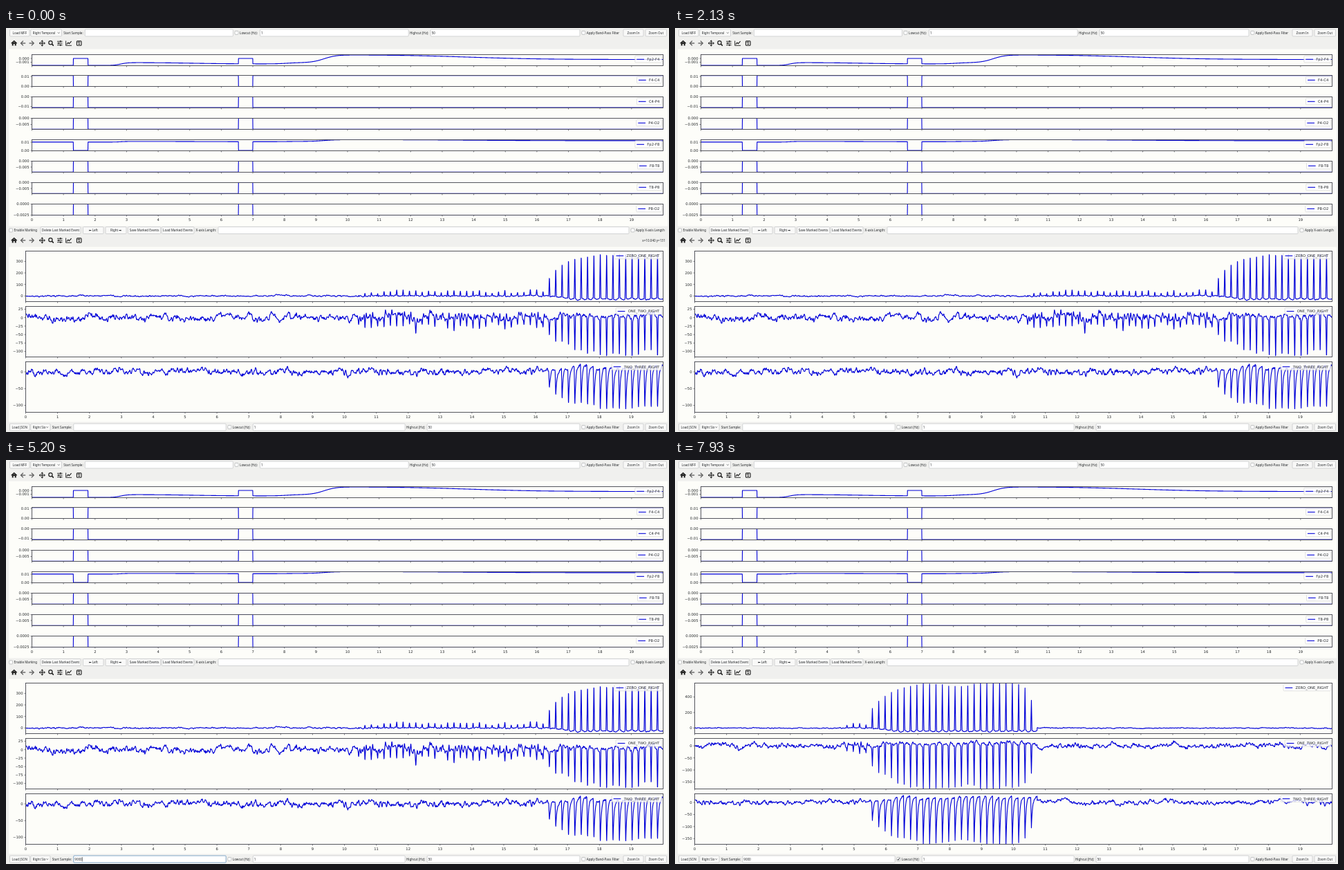
An HTML page with a canvas for the animation above (8000 ms loop, 959 px wide and 584 px high).

```html
<!DOCTYPE html>
<html lang="en">
<head>
<meta charset="utf-8">
<title>Signal viewer</title>
<style>
html, body { margin: 0; width: 100%; height: 100%; overflow: hidden; background: #f0f0ee; }
canvas { display: block; }
</style>
</head>
<body>
<canvas id="stage" width="959" height="584"></canvas>
<script>
const c = document.getElementById('stage').getContext('2d');
const BLUE = '#0000d8', INK = '#232629', FRAME = '#44454f', EDGE = '#c3c5c6', PAPER = '#fdfdf9';
const UI = '4.56px "Noto Sans", "Open Sans", sans-serif';
const PLOT = '5.25px "DejaVu Sans", sans-serif';
const RIGHT = 950.5;

// ---- helpers
function text(s, x, y, align = 'left', font = UI) {
  c.font = font;
  c.textAlign = align;
  c.fillStyle = INK;
  c.fillText(s, x, y + 1.75);
}

function box(x0, y0, x1, y1, fill, edge, width = .7) {
  c.beginPath();
  c.roundRect(x0, y0, x1 - x0, y1 - y0, 1);
  c.fillStyle = fill;
  c.fill();
  c.strokeStyle = edge;
  c.lineWidth = width;
  c.stroke();
}

function line(points, color, width) {
  c.beginPath();
  for (let i = 0; i < points.length; i += 2) c.lineTo(points[i], points[i + 1]);
  c.strokeStyle = color;
  c.lineWidth = width;
  c.stroke();
}

function hash(i, seed) {
  const v = Math.sin(i * 127.1 + seed * 311.7) * 43758.5453;
  return (v - Math.floor(v)) * 2 - 1;
}

function noise(x, seed) {
  const i = Math.floor(x), f = x - i;
  return hash(i, seed) + (hash(i + 1, seed) - hash(i, seed)) * f * f * (3 - 2 * f);
}

const rise = (x, at, width) => 1 / (1 + Math.exp((at - x) / width));

function trace(fn, x0) {
  const path = new Path2D();
  for (let x = x0; x <= RIGHT; x += .2) path.lineTo(x, fn(x));
  return path;
}

const label = (v, digits) => v.toFixed(digits).replace('-', '−');

// ---- upper plots
// Slow drift of the frontal electrode, in pixels
const drift = x => 4.2 * rise(x, 166, 5) - 2 * rise(x, 270, 30) + 1.8 * rise(x, 405, 8)
  + 11.5 * rise(x, 460, 9) - 7 * rise(x, 670, 55);

// name, first tick after zero, its distance, zero and resting level below the top, share of drift
const channels = [
  ['Fp2-F4', '-0.001', 5.5, 5.5, 15.6, 1],
  ['F4-C4', '0.01', -14.5, 16, .3, 0],
  ['C4-P4', '-0.01', 14, 0, 15.6, 0],
  ['P4-O2', '-0.005', 9, 0, 15.8, 0],
  ['Fp2-F8', '0.01', -12, 15.6, 3.4, .23],
  ['F8-T8', '-0.005', 8.5, 0, 15.7, 0],
  ['T8-P8', '-0.005', 8.5, 0, 15.8, 0],
  ['P8-O2', '-0.0025', 16, 0, 16, 0]
].map(([name, step, gap, zero, rest, share], i) => {
  const top = Math.floor(38 + i * 30.9) + .5, digits = step.length - step.indexOf('.') - 1;
  const pulse = x => (x > 97.5 && x < 118.6) || (x > 336.2 && x < 357);
  return {
    name, top, bottom: top + 16,
    ticks: [0, 1].map(n => [label(n * step, digits), top + zero + n * gap]),
    path: trace(x => top + (pulse(x) ? zero : rest - share * drift(x)), 37.5)
  };
});

// ---- lower plots: two windows on one stream of brain waves
const SHIFT = 500.5, FIRST = 786, GAP = 9.2, LAST = 25;
const leads = ['ZERO_ONE_RIGHT', 'ONE_TWO_RIGHT', 'TWO_THREE_RIGHT']
  .map((name, i) => ({ name, top: 322.5 + i * 80.2, bottom: 395 + i * 80.2 }));

// per lead: zero level, pixels per unit, tick step, tallest spike
const views = [
  [[387.3, .1664, 100, 67], [418.7, .489, 25, 56], [497, .486, 50, 56]],
  [[387.5, .1122, 200, 67], [413.2, .349, 50, 63], [495, .349, 50, 61]]
].map((rows, late) => rows.map(([zero, scale, step, tall], row) => {
  const ticks = [], { top, bottom } = leads[row];
  for (let v = -200; v <= 400; v += step) {
    const y = zero - v * scale;
    if (y > top && y < bottom) ticks.push([label(v, 0), y]);
  }
  return { zero, scale, ticks, path: trace(x => zero + wave(row, x, late, tall), 28.5) };
}));

function spikeSize(k, late) {
  const grow = 1 - .57 * Math.exp(-k / (late ? 3.2 : 2.4));
  if (!late) return grow;
  return grow * (1 - .4 * Math.exp(k - LAST)) * (1 - .1 * Math.exp(-(((k - 13.5) / 3) ** 2)));
}

function wave(row, x, late, tall) {
  const u = x + late * SHIFT, size = late ? .7 : 1;
  const k = Math.floor((u - FIRST + 1) / GAP), d = u - FIRST - k * GAP;
  const tip = Math.max(0, d < 0 ? 1 + d : 1 - d / .9);
  const y = size * [1.3, 6.2, 5.8][row] * (noise(u / 11, row) ** 3 + noise(u / 6, row + 4) * .45
    + noise(u / 2.1, row + 7) * .6 + noise(u / .8, row + 9) * .35);

  if (k >= 0 && k <= LAST) {
    const h = tall * spikeSize(k, late), grow = Math.min(1, (k + 1) / 5);
    const rest = Math.sin(Math.PI * Math.max(0, d) / GAP);
    if (row === 0) return y - h * tip + grow * (1 - tip) * (2.5 + 2.5 * rest);
    if (row === 1) return y * .8 + h * tip - grow * (1 - tip) * (1 + 4 * rest);
    const dip = d < 0 ? 1 + d : Math.exp(-d / 1.5);
    return y * .6 + h * dip - grow * 8 * (1 - dip);
  }
  // Small spikes lead up to the seizure
  if (row < 2 && k < 0 && k >= (late ? -4 : -30)) {
    const h = size * (1 + .4 * hash(k, 3));
    if (row === 0) return y - tip * h * (3 + 4 * rise(k, -26, 1));
    return y + h * (13 * tip - 6 * Math.max(0, 1 - Math.abs(d - 2)));
  }
  return y;
}

// ---- plot furniture
function axes({ name, top, bottom }, x0, step, ticks, path, labels, width) {
  const y0 = Math.floor(top) + .5, y1 = Math.floor(bottom) + .5;
  for (let i = 0; i < 20; i++) {
    const x = x0 + i * step;
    line([x, y1, x, y1 + 2], FRAME, .7);
    if (labels) text(i, x, y1 + 6.3, 'center', PLOT);
  }
  for (const [s, y] of ticks) {
    line([x0 - 2, y, x0, y], FRAME, .7);
    text(s, x0 - 4, y + .1, 'right', PLOT);
  }
  c.save();
  c.beginPath();
  c.rect(x0, y0, RIGHT - x0, y1 - y0);
  c.clip();
  c.strokeStyle = BLUE;
  c.lineWidth = width;
  c.lineJoin = 'round';
  c.stroke(path);
  c.restore();
  c.strokeStyle = FRAME;
  c.lineWidth = .9;
  c.strokeRect(x0, y0, RIGHT - x0, y1 - y0);

  const mid = top + 6.8;
  c.font = PLOT;
  const tx = 945.3 - c.measureText(name).width;
  box(tx - 17.5, mid - 5, 948.5, mid + 4.5, 'rgba(255,255,255,.8)', '#d4d4d4');
  line([tx - 15, mid, tx - 4.3, mid], BLUE, 1.1);
  text(name, tx, mid + .1, 'left', PLOT);
}

// ---- widgets
function button(s, x0, x1, y) {
  box(x0, y - 5, x1, y + 5, '#f9f9f8', EDGE);
  text(s, (x0 + x1) / 2, y, 'center');
}

function combo(s, x0, x1, y) {
  box(x0, y - 5, x1, y + 5, '#f9f9f8', EDGE);
  text(s, x0 + 3, y);
  line([x1 - 5.7, y - .7, x1 - 4.3, y + .7, x1 - 2.9, y - .7], INK, .6);
}

function field(s, x0, x1, y, edge = EDGE) {
  box(x0, y - 5, x1, y + 5, '#fff', edge);
  text(s, x0 + 1.5, y);
}

function check(s, x, y, state) {
  box(x, y - 2.6, x + 5, y + 2.4, state === 'down' ? '#b9bbbd' : '#fff', '#b4b6b8', .8);
  if (state === 'on') line([x + 1, y, x + 2.1, y + 1.3, x + 4, y - 1.6], INK, .9);
  text(s, x + 7, y);
}

function filterBar(file, side, sideEnd, low, high, y, typed, edge, state) {
  button(file, 5.5, 34, y);
  combo(side, 35.8, sideEnd, y);
  text('Start Sample:', sideEnd + 2.7, y);
  field(typed, sideEnd + 33.8, low - 2.6, y, edge);
  check('Lowcut (Hz):', low, y, state);
  field('1', low + 36.5, high - 1.8, y);
  text('Highcut (Hz):', high, y);
  field('50', high + 30.2, 830, y);
  check('Apply Band-Pass Filter', 832.8, y);
  button('Zoom In', 893, 922, y);
  button('Zoom Out', 925, 955.5, y);
}

function toolbar(y) {
  const dark = '#1c1c1c', grey = '#5c5c5c';
  const pen = (x, p, width, color = dark) => line(p.map((v, i) => v + (i % 2 ? y : x)), color, width);
  // home
  pen(11.7, [-4, .2, 0, -3.3, 4, .2], 1.3);
  pen(11.7, [-2, -.8, -2, 3.5], 2);
  pen(11.7, [2, -.8, 2, 3.5], 2);
  pen(11.7, [-2, -.3, 2, -.3], 2.4);
  // back, forward
  for (const [x, s] of [[24.7, 1], [37, -1]]) {
    pen(x, [-3 * s, 0, 3.5 * s, 0], 1.3, grey);
    pen(x, [.2 * s, -3.4, -3.2 * s, 0, .2 * s, 3.4], 1.3, grey);
  }
  // pan
  for (const [a, b] of [[1, 0], [-1, 0], [0, 1], [0, -1]]) {
    pen(52.3, [0, 0, a * 4, b * 4], 1.1);
    pen(52.3, [a * 2.5 + b * 1.6, b * 2.5 + a * 1.6, a * 4, b * 4, a * 2.5 - b * 1.6, b * 2.5 - a * 1.6], 1);
  }
  // zoom
  c.beginPath();
  c.arc(64.4, y - .8, 2.6, 0, 7);
  c.strokeStyle = dark;
  c.lineWidth = 1.2;
  c.stroke();
  pen(64.4, [1.9, 1.1, 4.4, 3.6], 1.5);
  // sliders
  for (let i = -1; i < 2; i++) {
    const dy = i * 2.7, dx = i ? 1 : -1.5;
    pen(77.8, [-3.8, dy, 3.8, dy], .9);
    pen(77.8, [dx, dy - 1.2, dx, dy + 1.2], 1.3);
  }
  // chart
  pen(90.6, [-4, -3.5, -4, 3.3, 4.4, 3.3], .9);
  pen(90.6, [-2.8, 1.6, -.7, -.9, .8, .6, 4, -2.8], 1.1);
  // save
  box(102.4, y - 3.3, 109, y + 3.3, '#f0f0ee', dark, 1.1);
  pen(105.7, [-2, -1.6, 1.5, -1.6], 1.3);
  pen(105.7, [-1, 1.2, 1, 1.2], 1.8);
}

// ---- pointer readout while the mouse travels down to the text field
function readout(t) {
  const p = Math.min(1, Math.max(0, Math.ceil((t - 1530) / 60) / 10));
  const e = p * p * (3 - 2 * p), py = 365.5 + 212 * e;
  const row = leads.findIndex(l => py > l.top && py < l.bottom);
  if (row < 0) return '';
  const { zero, scale } = views[0][row];
  return `x=${(10.04 - 6.2 * e).toFixed(3)} y=${label((zero - py) / scale, row ? 1 : 0)}`;
}

function draw(t) {
  c.fillStyle = '#f0f0ee';
  c.fillRect(0, 0, 959, 584);
  c.fillStyle = PAPER;
  c.fillRect(4, 30.5, 953, 256);
  c.fillRect(4, 316.5, 953, 253);

  filterBar('Load MFF', 'Right Temporal', 80.5, 331, 584, 7, '');
  toolbar(22);
  channels.forEach((ch, i) => axes(ch, 37.5, 45.65, ch.ticks, ch.path, i === 7, 1.1));

  check('Enable Marking', 4.6, 292.5);
  button('Delete Last Marked Event', 50, 108, 292.5);
  button('⬅ Left', 111.5, 141, 292.5);
  button('Right ➡', 144, 174, 292.5);
  button('Save Marked Events', 176.5, 223.5, 292.5);
  button('Load Marked Events', 225.3, 272, 292.5);
  text('X-axis Length:', 274.5, 292.5);
  field('', 307, 901, 292.5);
  check('Apply X-axis Length', 904, 292.5);
  toolbar(307);
  text(readout(t), 953.5, 307, 'right');

  const late = t >= 7930 ? 1 : 0;
  leads.forEach((l, i) => {
    const { ticks, path } = views[late][i];
    axes(l, 28.5, 46.1, ticks, path, i === 2, 1.15);
  });

  const focus = t >= 3400 && t < 7470;
  const typed = t < 4330 ? '' : t < 4670 ? '900' : '9000';
  filterBar('Load JSON', 'Right Six', 64, 320.8, 579, 577, typed,
    focus ? '#4f86b5' : EDGE, late ? 'on' : t >= 7470 ? 'down' : '');
  if (focus && Math.floor((t - 4670) / 530) & 1) {
    c.font = UI;
    const x = 99.8 + c.measureText(typed).width;
    line([x, 574, x, 580.3], INK, .7);
  }
}

const start = performance.now();
(function tick() {
  draw((performance.now() - start) % 8000);
  requestAnimationFrame(tick);
})();
</script>
</body>
</html>
```
